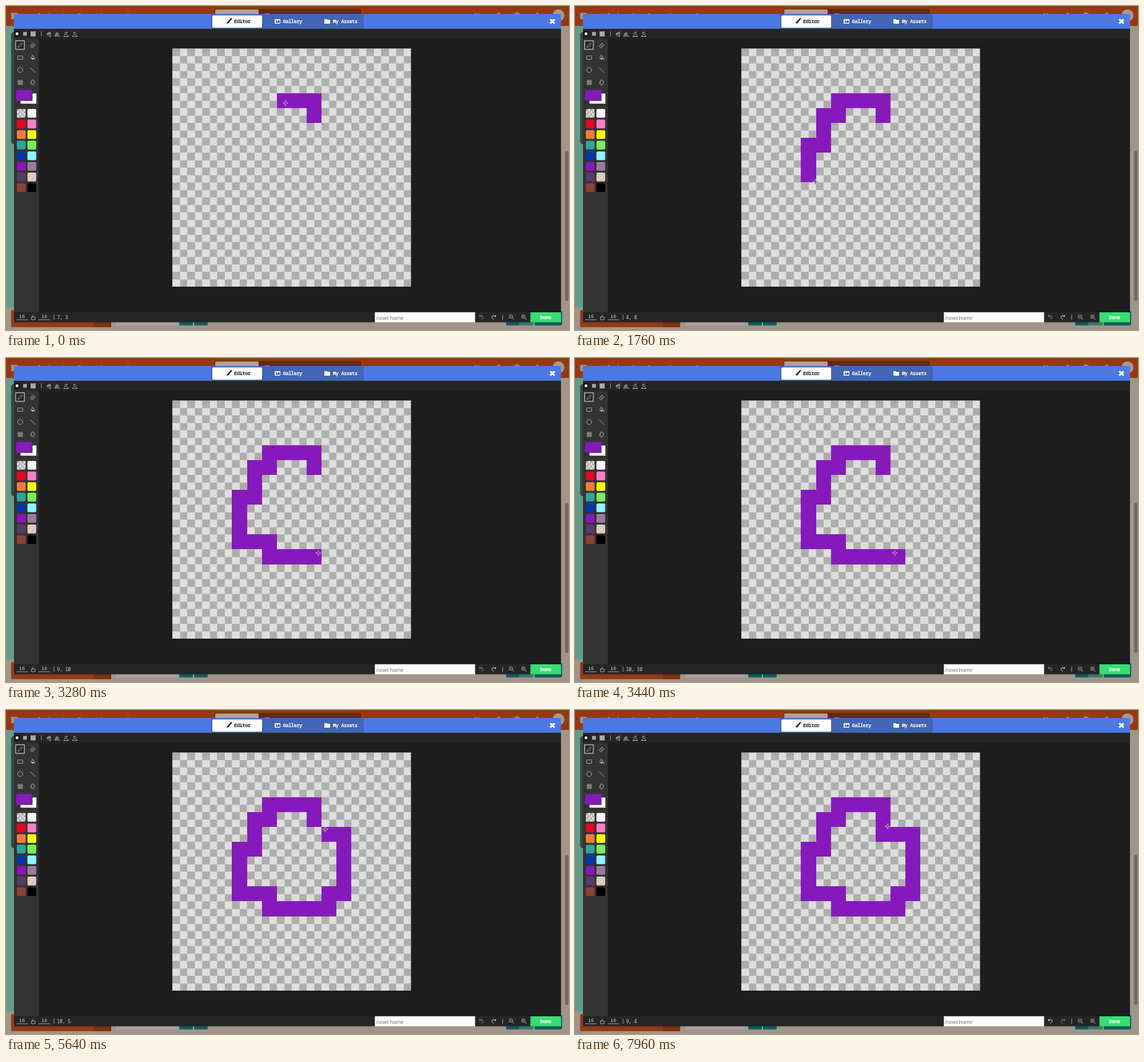
Recreate the animation shown at these times as an HTML page. Size 985 by 568 pixels, loop 8 s.

```html
<!DOCTYPE html>
<html lang="en">
<head>
<meta charset="utf-8">
<title>Pixel editor</title>
<style>
  html, body { margin: 0; width: 100%; height: 100%; overflow: hidden; background: #1d1d1d; }
  svg { display: block; width: 100vw; height: 100vh; }
  .mono { font: 9px "Noto Sans Mono", "DejaVu Sans Mono", monospace; letter-spacing: -.65px; }
  .bold { font-weight: 600; }
  .sans { font: 9px "Liberation Sans", Arial, sans-serif; }
  .line { fill: none; stroke: #bdbdbd; stroke-width: .9; }
  .crisp { shape-rendering: crispEdges; }
</style>
</head>
<body>
<svg viewBox="0 0 985 568" preserveAspectRatio="none">
  <defs>
    <pattern id="checker" x="291" y="74.4" width="26.1" height="26.1" patternUnits="userSpaceOnUse">
      <path class="crisp" fill="#dedede" d="M0 0h26.1v26.1H0z"/>
      <path class="crisp" fill="#adadad" d="M0 0h13.05v13.05H0zM13.05 13.05h13.05v13.05H13.05z"/>
    </pattern>
    <pattern id="clear" x="19" y="180.5" width="7.6" height="7.6" patternUnits="userSpaceOnUse">
      <path fill="#ddd" d="M0 0h7.6v7.6H0z"/>
      <path fill="#aaa" d="M0 0h3.8v3.8H0zM3.8 3.8h3.8v3.8H3.8z"/>
    </pattern>
  </defs>

  <!-- dimmed page behind the dialog -->
  <path fill="#9f9589" d="M0 0h985v568H0z"/>
  <path fill="#659b8b" d="M0 35h14v493H0z"/>
  <rect x="9" y="45" width="20" height="198" rx="6" fill="#3d4543"/>
  <path fill="#933a12" d="M0 0h985v35H0z"/>
  <rect x="365" y="5" width="256" height="20" rx="2" fill="#5e2a18"/>
  <rect x="366" y="6" width="76" height="20" rx="2" fill="#aaa19d"/>
  <path fill="#a99388" d="M9 12h12v11H9z"/>
  <g fill="#a98a7b">
    <path d="M75 11h1v4h-1zM57 12.5h3v2h-3zM100 13h2v1h-2zM127 13h4v1h-4zM166 13h2v1h-2zM212 13h3v1h-3zM453 13h9v2h-9zM820 12.5h3v2h-3zM826 12.5h2v2h-2z"/>
    <circle cx="862" cy="14" r="2.5"/><circle cx="894" cy="17" r="6"/><circle cx="930" cy="14" r="2.5"/>
  </g>
  <circle cx="966.500" cy="16.500" r="10.500" fill="#a39c94"/>
  <rect x="978" y="254" width="6" height="263" rx="3" fill="#716b64"/>
  <rect x="9" y="533" width="175" height="30" rx="2" fill="#933a12"/>
  <path fill="#7d310f" d="M154 533h30v30h-30z"/>
  <rect x="193" y="540" width="110" height="20" fill="#a7a19a"/>
  <g fill="#0d605f">
    <rect x="303" y="540" width="24" height="20" rx="2"/><rect x="329" y="540" width="24" height="20" rx="2"/>
    <rect x="875" y="540" width="48" height="20" rx="2"/><rect x="925" y="535" width="48" height="25" rx="2"/>
  </g>
  <path fill="#397876" d="M898 540h25v20h-25z"/>

  <!-- dialog -->
  <path fill="#1d1d1d" d="M14 14h957v540H14z"/>
  <path fill="#4c79e2" d="M14 14h957v26H14z"/>
  <path fill="#252525" d="M14 40h957v17.500H14zM14 537h957v17.500H14z"/>
  <path fill="#333" d="M14 57.500h43.500V537H14z"/>
  <rect x="359" y="14.500" width="267" height="25.500" rx="2" fill="#4265b5"/>
  <rect x="361" y="16.500" width="87" height="21.500" rx="2" fill="#fff"/>
  <g class="mono bold">
    <text x="399" y="30" fill="#222">Editor</text>
    <text x="484.500" y="30" fill="#fff">Gallery</text>
    <text x="572" y="30" fill="#fff">My Assets</text>
  </g>
  <path d="M394 22.500l-4.500 5" stroke="#222" stroke-width="2.600" stroke-linecap="round"/>
  <path d="M385 29.500q2-.2 2.500-2.200q2-1 3.200 1.200q-.7 3.500-5.700 1z" fill="#222"/>
  <rect x="470" y="23" width="10" height="8" rx="1" fill="#fff"/>
  <path d="M471.500 29.500v-1.500l2-2 1.300 1.300 2.700-2.700 1.500 1.800v3.100z" fill="#4265b5"/>
  <circle cx="472.700" cy="25" r="1" fill="#4265b5"/>
  <path d="M557 24q0-1 1-1h3l1.200 1.300h3.800q1 0 1 1V30q0 1-1 1h-8q-1 0-1-1z" fill="#fff"/>
  <path d="M952.300 23.300l7.400 7.400m0-7.400l-7.400 7.400" stroke="#fff" stroke-width="3.200"/>

  <!-- brush sizes and transforms -->
  <path fill="#111" d="M15 44h8.500v9.500H15z"/>
  <path fill="#fff" d="M17 46.500h4.500V51H17z"/>
  <path fill="#a8a8a8" d="M30 45.500h6.500V52H30zM43 44.500h9v9h-9z"/>
  <path class="line" d="M62 44.500v8.500M71 49.500h8M78 45.500v2.500h-6zM78 51v2.500l-6-2.500M89.500 45.500v8M88 47v6h-3zM91.500 47v6h3"/>
  <path class="line" d="M101 53.500h8.500l-4.200-4.500zM102 49q1-3.500 5-2.500M105.500 45l2 1.500-1.500 2M116 53.500h8.500l-4.200-4.500zM123.500 49q-1-3.500-5-2.500M120 45l-2 1.500 1.500 2"/>

  <!-- tools -->
  <rect x="17" y="61" width="15" height="15" fill="#222" stroke="#fff"/>
  <path class="line" d="M21 72.500l.7-2.600 5.300-5.300 1.900 1.900-5.300 5.300z"/>
  <path class="line" d="M42.500 70.500l4.500-5 3.500 3-4 4.500h-2zM44.500 68.300l3.500 3"/>
  <path class="line" d="M20.500 87.500h8.500v6h-8.500z"/>
  <path class="line" d="M43 90.500l3.500-3.500 3.500 4-3.500 3zM45 85.500l3 3.500M50.500 91.500v3"/>
  <path fill="#bdbdbd" d="M43.500 91h6l-3 3z"/>
  <circle class="line" cx="24.700" cy="112.200" r="4.400"/>
  <path class="line" d="M42.500 108.200l8.200 8.200"/>
  <path class="line" stroke-dasharray="1.500 .8" d="M21 130h8v8h-8z"/>
  <path class="line" d="M23.500 130v8M26.500 130v8M21 132.500h8M21 135.500h8" stroke-width=".7"/>
  <path class="line" d="M44.500 137.500l-2-3.500 1-.4 1 1v-4q1-.8 1.200 0v-.8q1-.8 1.300 0v.8q1-.8 1.300 0v.8q1-.6 1.400.2v3.400l-1.200 2.500z"/>

  <!-- colours -->
  <path fill="#fff" stroke="#292929" stroke-width=".6" d="M25 153h28.500v18.500H25z"/>
  <path fill="#861abd" stroke="#4a2060" stroke-width=".8" d="M17.500 147h28.500v19H17.500z"/>
  <g id="palette"></g>

  <!-- artwork -->
  <path fill="url(#checker)" d="M291 74.400h417.600V492H291z"/>
  <path id="paint" class="crisp" fill="#8619bb"/>
  <g id="cursor" fill="none">
    <path d="M-4.500 0h3.700M.8 0h3.700M0-4.500v3.700M0 .8v3.700" stroke="#ddd" stroke-width="2.300" opacity=".85"/>
    <path d="M-4 0h8M0-4v8" stroke="#552a68" stroke-width=".9"/>
  </g>

  <!-- status bar -->
  <g class="sans" fill="#d0d0d0">
    <text x="23" y="547">16</text><text x="62" y="547">16</text>
  </g>
  <path class="line" d="M18 550h20M57 550h20M84 541.500v8.500M869 541.500v8.500"/>
  <path class="line" d="M44.500 545.500h6.500v4.500h-6.500zM46 545.500v-2q1.700-2.600 3.500 0"/>
  <text id="coords" class="mono" x="89" y="549" fill="#d0d0d0"></text>
  <path fill="#fff" stroke="#ccc" stroke-width=".5" d="M645.500 537h175v17.500h-175z"/>
  <text class="sans" x="647.500" y="550" fill="#757575" style="font-size:8.750px">Asset Name</text>
  <path id="undo" class="line" d="M828.500 541.500v3h3M828.500 544.500q2.500-3.500 5.500-1.200q2.500 3.500-2.500 6.200"/>
  <path id="redo" class="line" d="M856.500 541.500v3h-3M856.500 544.500q-2.500-3.500-5.500-1.200q-2.500 3.500 2.500 6.200"/>
  <g class="line">
    <circle cx="883.500" cy="544.500" r="3.200"/><path d="M886 547l3 3M882 544.500h3"/>
    <circle cx="905.300" cy="544.500" r="3.200"/><path d="M907.800 547l3 3M903.800 544.500h3M905.300 543v3"/>
  </g>
  <path fill="#36df74" d="M917.500 537H971v17.500h-53.500z"/>
  <text class="mono bold" x="934.500" y="549" fill="#fff">Done</text>
</svg>
<script>
const LOOP = 8000, CELL = 26.1, LEFT = 291, TOP = 74.4, RELEASE = 6450;
const $ = id => document.getElementById(id);

const swatches = ['url(#clear)', '#fff', '#e50720', '#f580c4', '#f17b35', '#ffff05', '#2ca39d', '#79f05a',
  '#0439aa', '#8cf5ff', '#8619bb', '#9c7c9f', '#5b3c69', '#dfcac2', '#8b403d', '#000'];
$('palette').innerHTML = swatches.map((fill, i) =>
  `<rect x="${19 + i % 2 * 18.5}" y="${180.5 + (i >> 1) * 18.6}" width="15.3" height="15.3" rx="2" fill="${fill}"/>`).join('');

// pointer path: time, x, y
const path = [
  [0, 489, 170], [230, 462, 170], [420, 460, 192], [600, 440, 195], [980, 436, 242],
  [1180, 412, 245], [1600, 412, 298], [1760, 420.5, 308], [1940, 412, 322], [2230, 462, 323],
  [2380, 464, 342], [2520, 484, 342], [3440, 559.5, 342], [3700, 565, 325], [4000, 590, 322],
  [5200, 591, 218], [5640, 558.5, 209.5], [5780, 557, 210], [6100, 545, 214], [6350, 547, 204], [LOOP, 547, 204]
];

function pointerAt(t) {
  const i = Math.max(1, path.findIndex(p => p[0] >= t));
  const [t0, x0, y0] = path[i - 1], [t1, x1, y1] = path[i];
  const k = (t - t0) / (t1 - t0);
  return [x0 + (x1 - x0) * k, y0 + (y1 - y0) * k];
}
const cellAt = t => {
  const [x, y] = pointerAt(t);
  return [Math.floor((x - LEFT) / CELL), Math.floor((y - TOP) / CELL)];
};

// each cell is painted when the pointer first enters it
const painted = new Map(['9,4', '9,3', '8,3'].map(key => [key, 0]));
for (let t = 0; t < LOOP; t += 10) {
  const key = cellAt(t).join();
  if (!painted.has(key)) painted.set(key, t);
}

function draw(t) {
  const [x, y] = pointerAt(t);
  let d = '';
  for (const [key, start] of painted) {
    if (start > t) continue;
    const [col, row] = key.split(',');
    d += `M${LEFT + col * CELL} ${TOP + row * CELL}h${CELL}v${CELL}h${-CELL}z`;
  }
  $('paint').setAttribute('d', d);
  $('cursor').setAttribute('transform', `translate(${x} ${y})`);
  $('coords').textContent = cellAt(t).join(', ');
  const released = t >= RELEASE;
  $('undo').style.stroke = released ? '#eee' : '#999';
  $('redo').style.stroke = released ? '#888' : '#ddd';
}

const begin = performance.now();
function tick() {
  draw((performance.now() - begin) % LOOP);
  requestAnimationFrame(tick);
}
tick();
</script>
</body>
</html>
```
